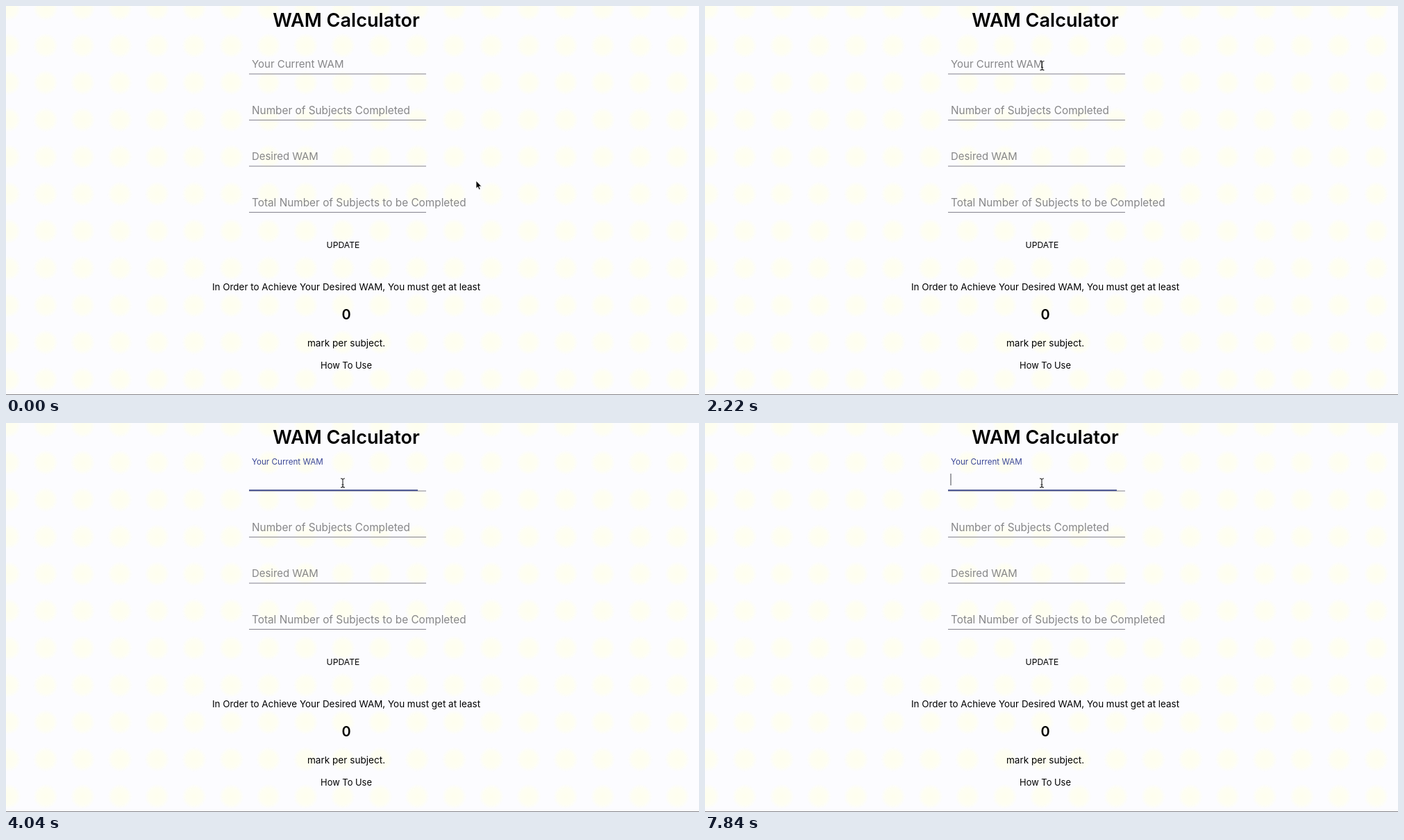
Write an HTML page that moves like this. It is 998x561 px and loops after 8000 ms.

```html
<!DOCTYPE html>
<html lang="en">
<head>
<meta charset="utf-8">
<title>WAM Calculator</title>
<style>
  html, body { margin: 0; width: 100%; height: 100%; overflow: hidden; background: #fcfcff; }
  svg { display: block; width: 100%; height: 100%; }
  text { font-family: Inter, "Open Sans", sans-serif; font-optical-sizing: none; fill: #000; }
  .center { text-anchor: middle; }
  .label { fill: #868688; }
  .rule { fill: #83828d; }
  #caret { fill: #444650; }
</style>
</head>
<body>
<svg viewBox="0 0 998 561" preserveAspectRatio="none">
  <defs>
    <radialGradient id="glow">
      <stop offset="0" stop-color="#fefeee"/>
      <stop offset=".65" stop-color="#fefef2"/>
      <stop offset="1" stop-color="#fefef2" stop-opacity="0"/>
    </radialGradient>
    <pattern id="checks" x="-23.2" y="-23.2" width="53.5" height="53.5" patternUnits="userSpaceOnUse">
      <circle cx="26.75" cy="26.75" r="18" fill="url(#glow)"/>
    </pattern>
  </defs>
  <rect width="998" height="561" fill="#fcfcff"/>
  <rect width="998" height="561" fill="url(#checks)"/>
  <rect y="560" width="998" height="1" fill="#858489"/>

  <g class="center">
    <text x="490" y="30" font-size="27.1" font-weight="600">WAM Calculator</text>
    <text x="485.5" y="348.7" font-size="12.2">UPDATE</text>
    <text x="490" y="409.5" font-size="13.45">In Order to Achieve Your Desired WAM, You must get at least</text>
    <text x="490" y="452" font-size="20" font-weight="600">0</text>
    <text x="490" y="490.5" font-size="13.6">mark per subject.</text>
    <text x="490" y="523" font-size="12.9">How To Use</text>
  </g>

  <g class="rule">
    <rect x="350" y="97.5" width="255" height="1"/>
    <rect x="350" y="164" width="255" height="1"/>
    <rect x="350" y="230.5" width="255" height="1"/>
    <rect x="350" y="297" width="255" height="1"/>
  </g>
  <rect id="highlight" x="350" y="73" width="30.5" height="20.5" fill="#d3dcec"/>
  <rect id="ripple" y="96" height="2" fill="#505a96"/>
  <text id="floating" class="label" font-size="15">Your Current WAM</text>
  <text class="label" x="354" y="155.5" font-size="15.35">Number of Subjects Completed</text>
  <text class="label" x="354" y="222" font-size="14.9">Desired WAM</text>
  <text class="label" x="354" y="288.5" font-size="15.35">Total Number of Subjects to be Completed</text>
  <rect id="caret" x="353.5" y="73" width="1" height="17"/>

  <path id="arrow" d="M0 0V11.2L2.5 8.9L4.3 13L6.2 12.2L4.5 8.2H7.8Z" fill="#000" stroke="#fff" stroke-width=".8"/>
  <path id="beam" d="M-3 -6.5Q0 -6.5 0 -4.5Q0 -6.5 3 -6.5M0 -5V5M-3 6.5Q0 6.5 0 4.5Q0 6.5 3 6.5M-1.5 2.5H1.5"
        fill="none" stroke="#222" stroke-width="1.1"/>
</svg>
<script>
  const LOOP = 8000;
  const $ = id => document.getElementById(id);
  const parts = Object.fromEntries(
    ['highlight', 'ripple', 'floating', 'caret', 'arrow', 'beam'].map(id => [id, $(id)]));

  const clamp = v => Math.min(1, Math.max(0, v));
  const mix = (a, b, p) => a + (b - a) * p;
  const smooth = p => p * p * (3 - 2 * p);
  const linear = p => p;

  // Interpolates [time, ...values] keys.
  function along(keys, t, ease = linear) {
    let i = 0;
    while (i < keys.length - 2 && t >= keys[i + 1][0]) i++;
    const [a, b] = [keys[i], keys[i + 1]];
    const p = ease(clamp((t - a[0]) / (b[0] - a[0])));
    return a.slice(1).map((v, k) => mix(v, b[k + 1], p));
  }

  const pointer = [[0, 677, 252], [560, 564, 205.5], [840, 564, 205.5], [1560, 551, 185],
                   [1660, 551, 185], [2220, 485.5, 86], [2400, 485, 86.5]];
  const focus = [[2480, 0], [2540, .84], [2640, .84], [2760, 1]];

  function caretOpacity(t) {
    if (t < 2520 || (t >= 4040 && t < 5040) || (t >= 6440 && t < 6460)) return 0;
    const phase = (t - 2240) % 1400;
    if (t < 3240) return 1 - clamp((t - 3080) / 160);
    return phase < 700 ? 1 - clamp((phase - 560) / 140) : 0;
  }

  function draw(t) {
    const [x, y] = along(pointer, t, smooth);
    const overField = x < 605;
    for (const [part, shown] of [[parts.arrow, !overField], [parts.beam, overField]]) {
      part.setAttribute('transform', `translate(${x} ${y})`);
      part.style.visibility = shown ? 'visible' : 'hidden';
    }

    const [p] = along(focus, t);
    parts.floating.setAttribute('transform', `translate(354 ${mix(89, 60.2, p)}) scale(${mix(1, .777, p)})`);
    parts.floating.style.fill = `rgb(${mix(134, 58, p)} ${mix(134, 70, p)} ${mix(136, 150, p)})`;
    parts.ripple.setAttribute('x', 471.5 - 121.5 * p);
    parts.ripple.setAttribute('width', 243 * p);
    parts.highlight.style.opacity = t < 2520 ? 0 : 1 - clamp((t - 2640) / 120);
    parts.caret.style.opacity = caretOpacity(t);
  }

  const start = performance.now();
  function tick() {
    draw((performance.now() - start) % LOOP);
    requestAnimationFrame(tick);
  }
  tick();
</script>
</body>
</html>
```
